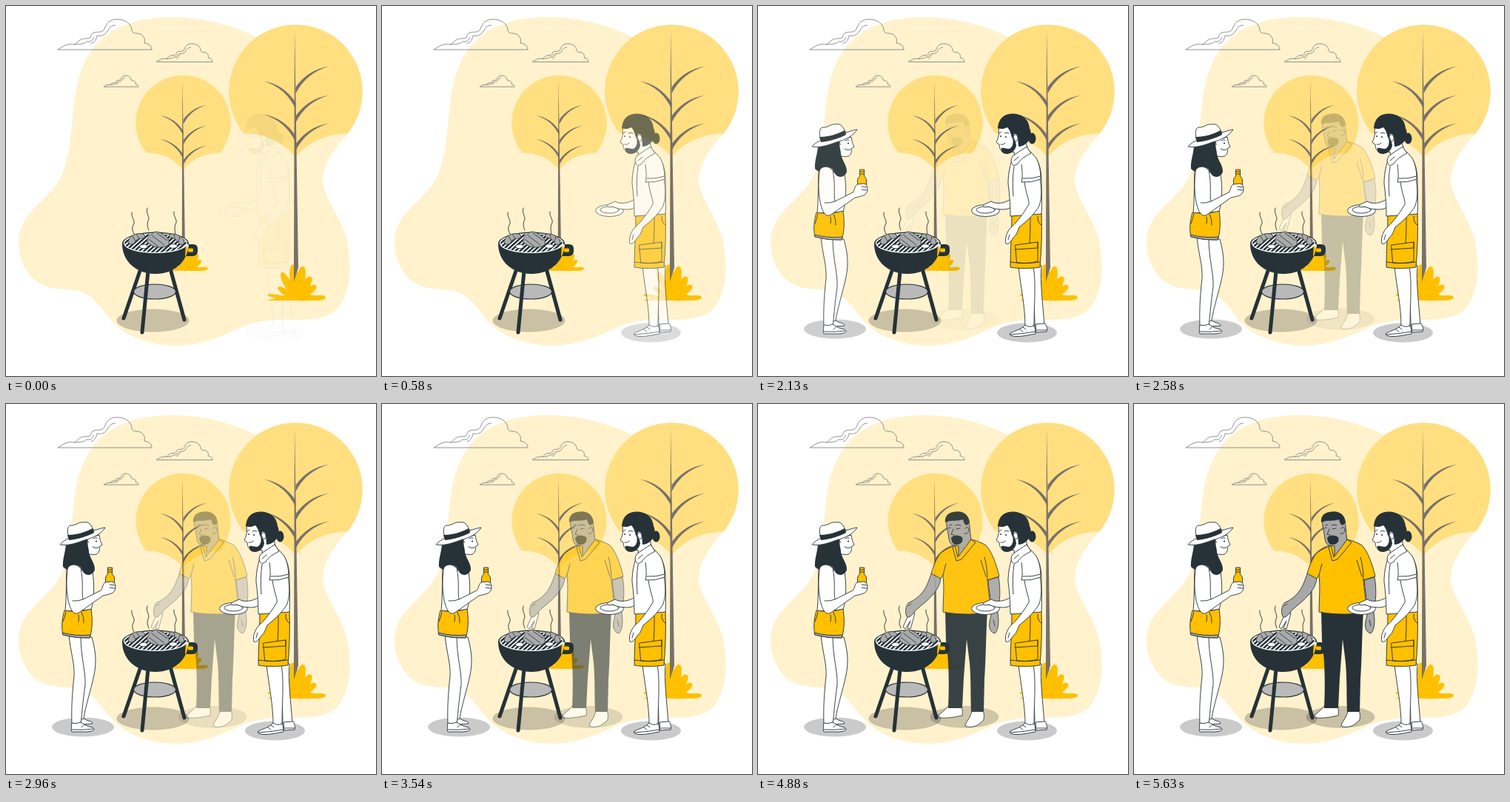
Animation of 500 by 500 pixels, one loop 5830 ms. Source, as an HTML page:

```html
<!DOCTYPE html>
<html lang="en">
<head>
<meta charset="utf-8">
<title>Barbecue</title>
<style>
  html, body { margin: 0; width: 100%; height: 100%; overflow: hidden; background: #fff; }
  svg { display: block; width: 100%; height: 100%; }
  .ink { fill: #263238; }
  .line { fill: none; stroke: #263238; stroke-width: .9; stroke-linecap: round; stroke-linejoin: round; }
  .skin { fill: #fff; }
  .cloth { fill: #ffc000; }
  .tan { fill: #a8a8a8; }
  .skin, .cloth, .tan { stroke: #263238; stroke-width: .9; stroke-linejoin: round; }
  .shade { fill: #222; opacity: .24; }
  .cloud { fill: none; stroke: #858585; stroke-width: .9; }
  .bush { fill: #ffc000; }
</style>
</head>
<body>
<svg viewBox="0 0 500 500">
  <defs>
    <g id="cloud">
      <path d="M0 41H127C127 35 122 33 117 32C119 25 114 19 107 19C103 19 100 18 100 14C99 5 90 0 80 0C70 0 66 5 63 13C60 19 54 16 49 18C42 20 48 26 40 26C30 25 27 31 23 34C13 32 8 36 0 41Z"/>
      <path d="M22 34C30 33 35 34 39 30C45 31 47 28 49 24M45 33C50 31 52 27 53 22C60 23 64 21 67 16C70 10 74 8 78 8"/>
    </g>
    <pattern id="grate" width="4.2" height="4.2" patternUnits="userSpaceOnUse" patternTransform="rotate(48)">
      <rect width="4.2" height="4.2" fill="#fff"/>
      <rect width="2.5" height="4.2" fill="#263238"/>
    </pattern>
  </defs>

  <path fill="#fff2cc" d="M225 15C275 15 325 31 365 57L460 174C444 192 429 212 428 236C430 262 452 284 460 314C467 345 468 379 451 405C441 420 420 424 396 424C365 423 344 424 320 433C290 448 260 459 230 459C195 458 164 448 143 426C131 412 122 392 98 385C77 381 56 385 38 370C20 352 14 326 18 308C25 276 55 264 72 235C86 211 87 173 91 143C94 101 104 66 132 42C158 22 190 15 225 15Z"/>
  <use href="#cloud" class="cloud" x="70" y="18"/>
  <use href="#cloud" class="cloud" transform="translate(203 51) scale(.6)" style="stroke-width:1.5"/>
  <use href="#cloud" class="cloud" transform="translate(132 94) scale(.37)" style="stroke-width:2.4"/>

  <g id="smallTree" transform="translate(239.500 158) scale(.71)"/>
  <g id="smallBush" class="bush" transform="translate(245 357) scale(.7)"/>
  <g id="bigBush" class="bush" transform="translate(392 397)"/>
  <g id="bigTree" transform="translate(391.500 115.500)"/>

  <g id="cook">
    <ellipse class="shade" cx="279" cy="423" rx="46.500" ry="15"/>
    <path class="skin" d="M257 408C253 414 246 418 243 422C244 426 258 424 266 423L276 421C277 416 276 411 275 410ZM289 415C287 425 280 430 280 435C285 438 294 436 298 433L305 427C306 420 305 417 304 415Z"/>
    <path class="ink" d="M253 280L310 280C308 310 308 345 306 372L305 416L288 416C287 390 288 375 286 350L282 318L278 370L276 411L257 411C259 370 257 340 254 320Z"/>
    <path class="tan" d="M311 238L325 234C328 250 327 265 324 282C326 295 325 305 320 310C315 309 311 303 313 294C315 285 317 275 315 268C313 258 312 248 311 238Z"/>
    <path class="skin" d="M206 279L196 301L199 304L206 293L202 303L206 304L212 283Z"/>
    <path class="tan" d="M235 227L247 235C246 244 242 252 235 259C227 268 218 274 212 280C209 286 203 290 201 287C198 281 200 271 204 268C210 266 215 262 221 256C228 248 231 238 235 227Z"/>
    <path class="cloth" d="M268 191C255 195 246 200 243 207C237 217 235 226 234 229L247 236L250 231C252 250 250 265 250 281C270 285 300 285 313 281C314 265 311 250 310 238L326 233C322 215 315 198 308 191C300 186 292 184 288 183Z"/>
    <path class="tan" d="M255 158C254 165 256 170 257 175C258 184 259 190 264 191L271 192L271 207L288 186L286 166C285 155 282 150 270 150Z"/>
    <path class="ink" d="M253 160C252 153 256 147 264 146C275 143 285 148 286 160L282 164C279 163 278 160 277 156C270 159 262 156 253 160ZM261 181C264 176 272 177 276 180C278 186 274 190 268 190C263 190 262 186 261 181Z"/>
    <path class="cloth" d="M266 191L270 207L288 183L294 187L275 210L268 212L263 194Z"/>
    <path class="line" d="M257 168L260 167M268 169L273 168M259 164L262 163M267 164Q271 162 274 164M264 169L261 176L265 177M280 168Q285 164 285 171Q283 177 279 175M306 207C309 217 310 228 310 238M301 211L308 233M250 231L254 216M305 284V291M203 273L207 270M318 292L320 300"/>
  </g>

  <g id="grill">
    <ellipse class="shade" cx="198.500" cy="425" rx="49" ry="15.500"/>
    <g fill="none" stroke="#263238" stroke-linecap="round" stroke-width="5">
      <path d="M182 355L159 422M222 355L241 424"/>
      <ellipse cx="201" cy="386" rx="28.500" ry="10" fill="#b9b9b9" stroke-width="1.200"/>
      <path d="M192 358L184 441"/>
    </g>
    <path class="ink" d="M157 321C157 345 176 362 202 362C228 362 246 345 247 321A45 15.500 0 0 0 157 321ZM243 322H253Q259 322 259 328V331Q259 338 252 338H242Z"/>
    <rect x="246" y="327.500" width="7" height="5" rx="1.500" fill="#ffc000"/>
    <ellipse cx="202" cy="320.500" rx="42.500" ry="13" fill="url(#grate)" stroke="#fff" stroke-width="1.200"/>
    <g fill="#aaa" stroke="#263238" stroke-width=".8">
      <path d="M165 319C166 311 174 306 185 308Q189 310 187 314C180 313 176 316 173 321Q167 324 165 319Z"/>
      <path d="M191 319C189 313 196 309 199 306C205 303 211 308 216 311C222 316 222 323 216 325C208 327 198 327 191 319Z"/>
      <path d="M220 309Q227 306 235 311Q243 317 240 322Q234 324 232 318Q228 313 221 313Z"/>
      <path fill="none" d="M171 311L175 318M176 308L180 314M197 310L214 323M193 315L206 325M204 307L218 317M227 308L228 314M235 311L233 319"/>
      <g fill="#fff"><ellipse cx="186" cy="325" rx="5.500" ry="2.800"/><ellipse cx="226" cy="324.500" rx="5.500" ry="2.800"/></g>
    </g>
    <path class="line" d="M170 279C169 286 174 288 173 294C170 299 170 302 173 308M191 273C189 280 193 283 193 288C190 294 191 298 193 303M227 278C226 285 231 287 230 293C227 299 228 303 229 308"/>
  </g>

  <g id="host">
    <ellipse class="shade" cx="363.500" cy="441.500" rx="40.500" ry="13"/>
    <path class="skin" d="M366 352L383 351C381 375 385 402 387 432L374 432C374 400 370 380 366 352Z"/>
    <path class="skin" d="M375 430L388 429C391 434 391 438 390 440L376 441Z"/>
    <path class="skin" d="M352 352L372 352C376 375 373 400 373 436L361 434C361 405 355 380 352 352Z"/>
    <path class="skin" d="M361 431C355 438 345 439 340 443C341 447 350 447 358 446L375 443C375 438 374 434 373 432Q366 435 361 431Z"/>
    <path class="line" d="M341 444Q358 443 375 440M354 437L358 440M358 434L362 437M377 438H390"/>
    <path class="cloth" d="M343 283L383 280C384 305 383 330 381 353C368 355 352 355 341 353C341 330 343 305 343 283Z"/>
    <path class="line" d="M341 346Q362 349 381 346M348 323L378 319V345Q364 349 350 347ZM347 329L378 327V319M368 284C368 298 368 309 367 320M378 284Q377 292 383 296"/>
    <ellipse class="skin" cx="307.500" cy="276.500" rx="19" ry="8"/>
    <ellipse class="line" cx="307.500" cy="275.500" rx="12.500" ry="4.500"/>
    <path class="skin" d="M342 261C332 267 322 268 315 264L306 268C303 271 306 273 311 271L320 274C328 275 336 276 342 272Z"/>
    <path class="skin" d="M344 205C341 215 338 225 338 240C340 255 341 270 341 284L383 281C384 265 383 250 383 236C383 220 379 205 366 195C358 197 350 201 344 205Z"/>
    <path class="skin" d="M360 237C362 255 367 262 366 268C358 282 348 294 341 300C336 306 333 315 335 321C339 323 342 317 346 312C350 309 351 303 353 299C364 290 374 281 380 270C384 258 383 245 381 233Z"/>
    <path class="skin" d="M356 214C357 223 358 230 356 238Q370 239 382 234C382 222 380 212 375 204"/>
    <path class="line" d="M358 233Q370 234 382 230M346 217C344 230 344 245 345 257M340 309L338 316"/>
    <path class="skin" d="M325 165C326 174 325 178 322 184C323 186 325 186 326 187C326 191 328 197 333 199L346 197L347 208L365 194L361 182L351 158Z"/>
    <path class="ink" d="M324 165C325 152 332 146 343 145.400C357 145 366 153 367 165C370 172 369 178 366 182C362 187 357 190 352 190L351 177Q350 172 346 173L344 180C342 175 341 168 337 164C333 166 328 167 324 165Z"/>
    <path class="ink" d="M344 178C346 187 343 192 339 193C335 193 332 191 329 192C328 196 331 200 337 200C343 199 348 195 349 188L347 180Z"/>
    <ellipse class="ink" cx="370.500" cy="179" rx="5" ry="7.500"/>
    <path class="skin" d="M345 176Q349 171 351 177Q352 183 347 183Z"/>
    <path class="skin" d="M345 202L363 190L369 199C361 203 355 207 351 213L346 216C341 212 341 207 345 202Z"/>
    <path class="line" d="M326 172L329 170M333 172Q336 170 339 172M328 187Q332 188 334 185M346 209L352 204"/>
    <g class="ink"><circle cx="328" cy="176" r="1"/><circle cx="335" cy="177" r="1"/></g>
  </g>

  <g id="guest">
    <ellipse class="shade" cx="104" cy="436.500" rx="42" ry="13"/>
    <path class="skin" d="M98 314L116 315C123 340 122 355 117 375C112 395 106 415 104 430L96 430Z"/>
    <path class="skin" d="M100 427L105 425C110 429 117 428 117 432L103 433Z"/>
    <path class="skin" d="M85 312C87 335 93 350 92 368C90 385 88 410 89 433L101 433C103 415 104 400 107 380C108 362 101 342 101 314Z"/>
    <path class="skin" d="M89 431C88 437 88 441 89 443L110 443C119 442 121 440 117 437C110 436 105 433 101 430Q95 433 89 431Z"/>
    <path class="line" d="M89 440Q103 441 118 439M105 434L102 437"/>
    <path class="skin" d="M82 220C81 240 82 260 80 280L115 278C120 262 119 240 117 227Z"/>
    <path class="cloth" d="M79 279C75 292 75 303 77 312Q95 317 113 316C117 305 117 290 115 277Q97 282 79 279Z"/>
    <path class="tan" d="M76 309Q95 314 114 312L113 316Q95 317 77 312Z"/>
    <path class="line" d="M81 281Q79 289 77 294M102 281Q106 289 105 296M98 285Q99 289 98 294"/>
    <path class="cloth" d="M137.500 221H143.500V230Q146.500 232 146.500 236V243H134.500V236Q134.500 232 137.500 230Z"/>
    <path class="line" d="M137.500 224H143.500M137.500 227H143.500"/>
    <path class="skin" d="M84 219C80 240 82 268 89 279C92 284 96 284 100 281L131 259C140 257 147 256 148 249C148 243 147 240 142 240L134 241C130 244 131 249 128 252L104 264C102 255 105 240 101 222Q92 213 84 219Z"/>
    <path class="line" d="M90 266Q97 267 104 264M140 244L147 245M140 248L147 249"/>
    <path class="skin" d="M102 184L126 177C127 182 127 185 130 190C129 192 127 192 126 193C127 197 126 201 122 203C118 204 115 203 112 203L108 204Z"/>
    <path class="ink" d="M81 188C81 198 76 210 77 220L82 224C86 216 96 216 101 221C104 228 107 231 112 231C117 230 120 226 120 223C120 215 114 210 112 200C112 195 109 189 111 182Z"/>
    <path class="skin" d="M73 190C78 184 84 182 88 180L117 171C124 170 130 167 134 167C128 176 118 181 106 184C95 188 84 192 73 190Z"/>
    <path class="skin" d="M85 181C82 172 83 165 87 164C94 165 98 159 104 160C112 158 115 163 119 172Q104 181 85 181Z"/>
    <path class="ink" d="M83 177C95 177 108 173 117 168L119 174C110 179 96 183 85 184Z"/>
    <path class="line" d="M118 182Q121 180 123 181M117 193Q121 196 125 194M112 187Q109 184 109 190"/>
    <circle class="ink" cx="122" cy="185.500" r="1.100"/>
  </g>
</svg>
<script>
  const LOOP = 5830;
  const byId = id => document.getElementById(id);

  // Tapered branch from the trunk at height y; width is negative on the left
  const branch = (y, width, rise) =>
    `<path d="M0 ${y}Q${width * .3} ${y - rise * .75} ${width} ${y - rise}Q${width * .38} ${y - rise * .88} 0 ${y - 9}Z"/>`;
  const tree = '<path fill="#ffdf80" d="M-70 57A90.300 90.300 0 1 1 70 57C44 57 16 68 0 89C-17 68 -44 56 -70 57Z"/>' +
    '<g fill="#787069"><path d="M-1.500 -84L3.500 238L-2.500 257L-2.500 235Z"/>' +
    [3, 42, 80].map(y => branch(y, 45, 37)).join('') +
    [24, 69].map(y => branch(y, -43, 38)).join('') + '</g>';
  byId('smallTree').innerHTML = tree;
  byId('bigTree').innerHTML = tree;

  // Each leaf: angle from vertical, length, half width
  const leaves = [[-80, 39, 2.5], [-55, 30, 4], [-28, 42, 5], [-5, 48, 6], [12, 46, 6], [33, 37, 5.5], [55, 33, 5], [84, 40, 3]];
  const leaf = ([turn, len, half]) =>
    `<path transform="rotate(${turn})" d="M-1 0C${-half * 1.4} ${-len * .4} ${-half * 1.2} ${-len} 0 ${-len}S${half * 1.4} ${-len * .4} 1 0Z"/>`;
  const bush = leaves.map(leaf).join('') + '<path d="M-39 1L-22 -4Q0 -13 26 -5L40 -3Q38 1 28 1Z"/>';
  byId('smallBush').innerHTML = bush;
  byId('bigBush').innerHTML = bush;

  const fades = [
    { el: byId('host'), start: -30, span: 1900, power: 2.8 },
    { el: byId('guest'), start: 600, span: 2480, power: 2.6 },
    { el: byId('cook'), start: 1940, span: 3800, power: 1.65 }
  ];

  function draw(time) {
    const t = time % LOOP;
    for (const { el, start, span, power } of fades) {
      const p = Math.min(1, Math.max(0, (t - start) / span));
      el.setAttribute('opacity', 1 - (1 - p) ** power);
    }
  }

  const begin = performance.now();
  function tick() {
    draw(performance.now() - begin);
    requestAnimationFrame(tick);
  }
  tick();
</script>
</body>
</html>
```
